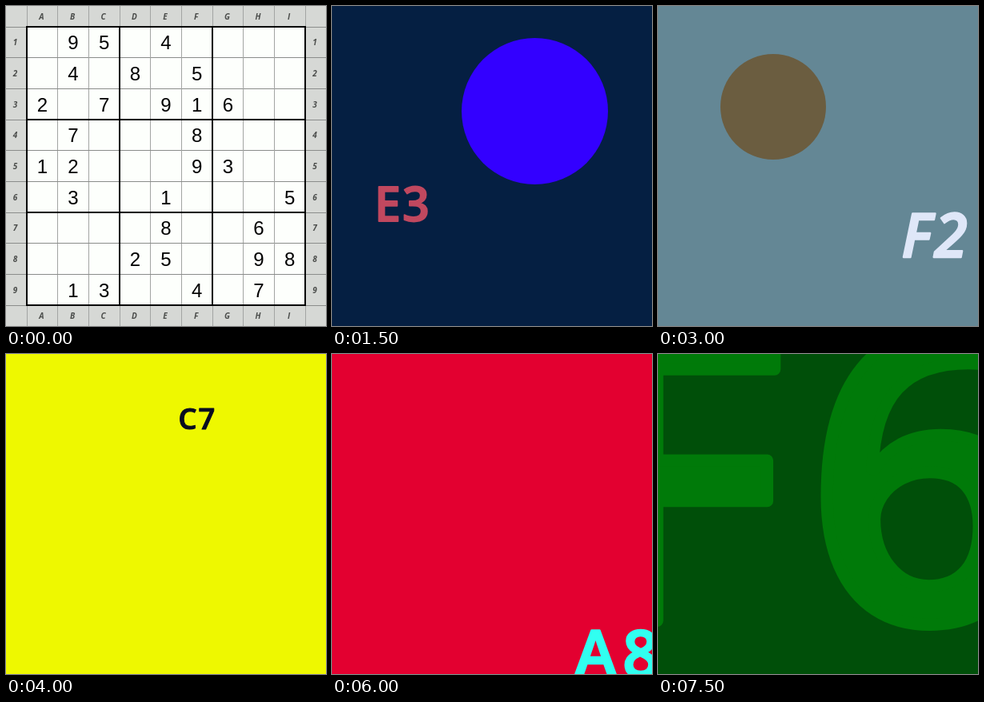
Write an HTML page with a canvas that moves like this. It is 400 by 400 pixels and loops after 8000 ms.

```html
<!DOCTYPE html>
<html lang="en">
<head>
<meta charset="utf-8">
<title>Sudoku flash cards</title>
<style>
  html, body { margin: 0; width: 100%; height: 100%; overflow: hidden; }
  canvas { display: block; width: 400px; height: 400px; }
</style>
</head>
<body>
<canvas id="stage" width="400" height="400"></canvas>
<script>
const ctx = document.getElementById('stage').getContext('2d');
const SLOT = 500;
const EDGE = 26, CELL = 348 / 9;
const ROWS = [
  '.95.4....', '.4.8.5...', '2.7.916..',
  '.7...8...', '12...93..', '.3..1...5',
  '....8..6.', '...25..98', '.13..4.7.'
];

function rect(color, x, y, w, h) {
  ctx.fillStyle = color;
  ctx.fillRect(x, y, w, h);
}

function disc(color, x, y, r) {
  ctx.fillStyle = color;
  ctx.beginPath();
  ctx.arc(x, y, r, 0, 7);
  ctx.fill();
}

// Sizes letters by cap height and aligns the ink's left edge with each x.
// A thin round-joined outline softens the corners.
function label(text, color, cap, baseline, xs, style = '') {
  const size = cap / 0.744, line = size * 0.03;
  ctx.font = `${style} 600 ${size}px "Open Sans", sans-serif`;
  ctx.textAlign = 'left';
  ctx.lineJoin = 'round';
  ctx.lineWidth = line;
  ctx.fillStyle = ctx.strokeStyle = color;
  [...text].forEach((ch, i) => {
    const x = xs[i] + ctx.measureText(ch).actualBoundingBoxLeft + line / 2;
    const y = baseline - line / 2;
    ctx.fillText(ch, x, y);
    ctx.strokeText(ch, x, y);
  });
}

function board() {
  rect('#d6d8d5', 0, 0, 400, 400);
  rect('#fdfffc', EDGE, EDGE, 348, 348);
  for (let i = 0; i <= 9; i++) {
    const p = Math.floor(EDGE + i * CELL);
    rect('#a3a5a3', p, 0, 1, 400);
    rect('#8b8d8b', 0, p, 400, 1);
  }
  for (let i = 0; i <= 9; i += 3) {
    const p = Math.floor(EDGE + i * CELL) - 1;
    rect('#000', p, EDGE - 1, 2, 350);
    rect('#000', EDGE - 1, p, 350, 2);
  }
  ctx.textAlign = 'center';
  for (let i = 0; i < 9; i++) {
    const mid = EDGE + (i + 0.5) * CELL;
    ctx.font = 'italic bold 10px "Open Sans", sans-serif';
    ctx.fillStyle = '#4b4d4b';
    for (const side of [12.5, 387]) {
      ctx.fillText('ABCDEFGHI'[i], mid - 1, side + 4);
      ctx.fillText(i + 1, side - 1, mid + 4);
    }
    ctx.font = '24px "Liberation Sans", Arial, sans-serif';
    ctx.fillStyle = '#000';
    [...ROWS[i]].forEach((d, col) => {
      if (d !== '.') ctx.fillText(d, EDGE + (col + 0.5) * CELL, mid + 9);
    });
  }
}

const plain = color => () => rect(color, 0, 0, 400, 400);
const card = (color, draw) => () => { plain(color)(); draw(); };
const NAVY = '#051f42', ROSE = '#c0485f', AQUA = '#31fff0';

const slides = [
  board,
  plain(NAVY),
  plain(NAVY),
  card(NAVY, () => {
    disc('#3300ff', 253.5, 131.5, 91.5);
    label('E3', ROSE, 44, 270, [57, 89]);
  }),
  plain(NAVY),
  card(NAVY, () => label('E3', ROSE, 107, 241, [124, 208])),
  card('#648795', () => {
    disc('#6b5d40', 144, 126, 66);
    label('F2', '#dfe7f8', 56, 315, [305, 343], 'italic');
  }),
  plain('#a9c04b'),
  card('#eef800', () => label('C7', '#080c20', 27, 95, [217, 241])),
  plain('#788006'),
  card('#02070b', () => label('H9', AQUA, 95, 300, [169, 259])),
  plain('#73041e'),
  card('#e30030', () => label('A8', AQUA, 59, 404, [302, 365])),
  plain('#971a23'),
  plain('#4c3516'),
  card('#004f09', () => label('F6', '#007a09', 380, 341, [-68, 196]))
];

let start;
function frame(now) {
  start ??= now;
  slides[Math.floor((now - start) / SLOT) % slides.length]();
  requestAnimationFrame(frame);
}
board();
requestAnimationFrame(frame);
</script>
</body>
</html>
```
